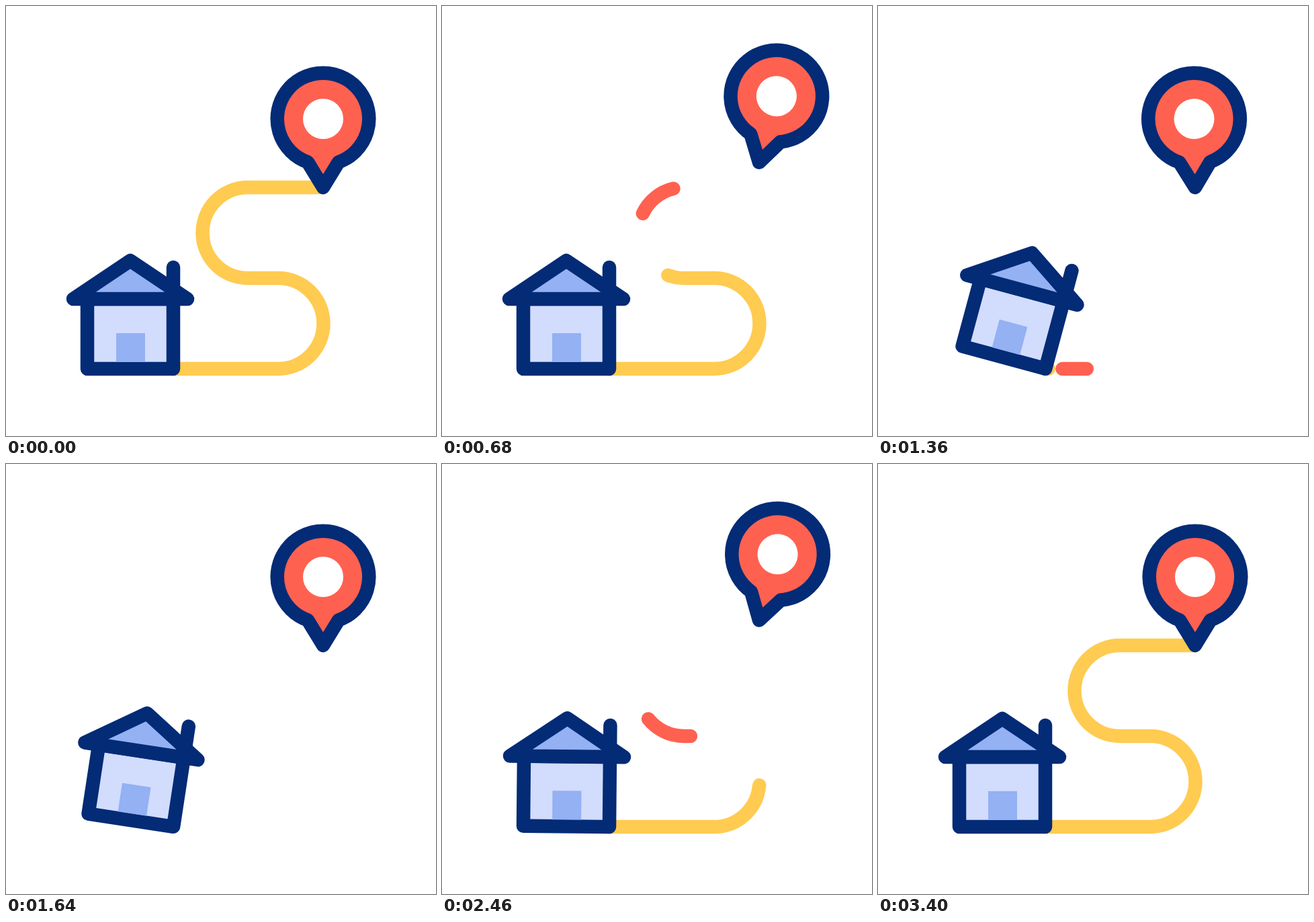
An HTML page for the animation above (3.6 s loop, 640 px wide and 640 px high).

```html
<!DOCTYPE html>
<html lang="en">
<head>
<meta charset="utf-8">
<title>Route home</title>
<style>
  html, body { margin: 0; width: 100%; height: 100%; overflow: hidden; background: #fff; }
  svg { display: block; width: 100%; height: 100%; }
  .line { fill: none; stroke-width: 20.5; stroke-linecap: round; stroke-linejoin: round; }
  .navy { stroke: #032b76; }
</style>
</head>
<body>
<svg viewBox="0 0 640 640">
  <path id="road" class="line" stroke="#ffcb50"
    d="M249 540H405A67.5 67.5 0 0 0 405 405H360A67.5 67.5 0 0 1 360 270H472"/>
  <path id="dash" class="line" stroke="#ff6150"/>
  <g id="house">
    <path class="line navy" style="fill:#d2dcfd" d="M121 436V540H249V436Z"/>
    <path fill="#93b1f3" d="M164 487h43v43h-43z"/>
    <path class="line navy" d="M249 389V436"/>
    <path class="line navy" style="fill:#93b1f3" d="M100 436L185 379L270 436Z"/>
  </g>
  <g id="pin">
    <path class="line navy" style="fill:#ff6150" d="M472 270L449 232.3A68.3 68.3 0 1 1 495 232.3Z"/>
    <circle cx="472" cy="168" r="30" fill="#fff"/>
  </g>
</svg>
<script>
const LOOP = 3600, MOVING = 3400, HOP = MOVING / 2;
const [road, dash, house, pin] = ['road', 'dash', 'house', 'pin'].map(id => document.getElementById(id));
dash.setAttribute('d', road.getAttribute('d'));
const length = road.getTotalLength();

function ease(t, from, to) {
  const x = Math.min(1, Math.max(0, (t - from) / (to - from)));
  return x * x * (3 - 2 * x);
}

// Distance along the road: runs back to the house, then out to the pin
const travel = (t, leave, arrive, start, end) =>
  length * (t < HOP ? 1 - ease(t, leave, arrive) : ease(t, start, end));

function trim(path, from, to) {
  path.style.visibility = to - from > 0.5 ? 'visible' : 'hidden';
  path.setAttribute('stroke-dasharray', `0 ${from} ${Math.max(0, to - from)} ${2 * length}`);
}

// Fading swing after the pin lands
function wobble(t) {
  const start = 1100, end = 1640;
  if (t < start || t > end) return 0;
  return -3.9 * Math.sin(Math.PI * (t - start) / 300) * (end - t) / (end - start);
}

const pinLift = t => 37.5 * (ease(t, 368, 700) - ease(t, 985, 1085));
const pinTilt = t => 15.7 * (ease(t, 250, 760) - ease(t, 985, 1120)) + wobble(t);

// Tips up quickly, then sinks back
const houseTilt = t =>
  15.1 * ease(t, 1040, 1340) * Math.exp((1360 - t) / 505) * (1 - ease(t, 2150, 2650));

function draw(t) {
  trim(road, 0, travel(t, 102, 1424, 1830, 3420));
  trim(dash, travel(t, 277, 1497, 1800, 3045), travel(t, 356, 1579, 1719, 2964));
  house.setAttribute('transform', `rotate(${houseTilt(t)} 250 540.5)`);
  const hop = t % HOP;
  pin.setAttribute('transform', `translate(0 ${-pinLift(hop)}) rotate(${pinTilt(hop)} 472 270)`);
}

function frame() {
  draw(Math.min(performance.now() % LOOP, MOVING));
  requestAnimationFrame(frame);
}
frame();
</script>
</body>
</html>
```
